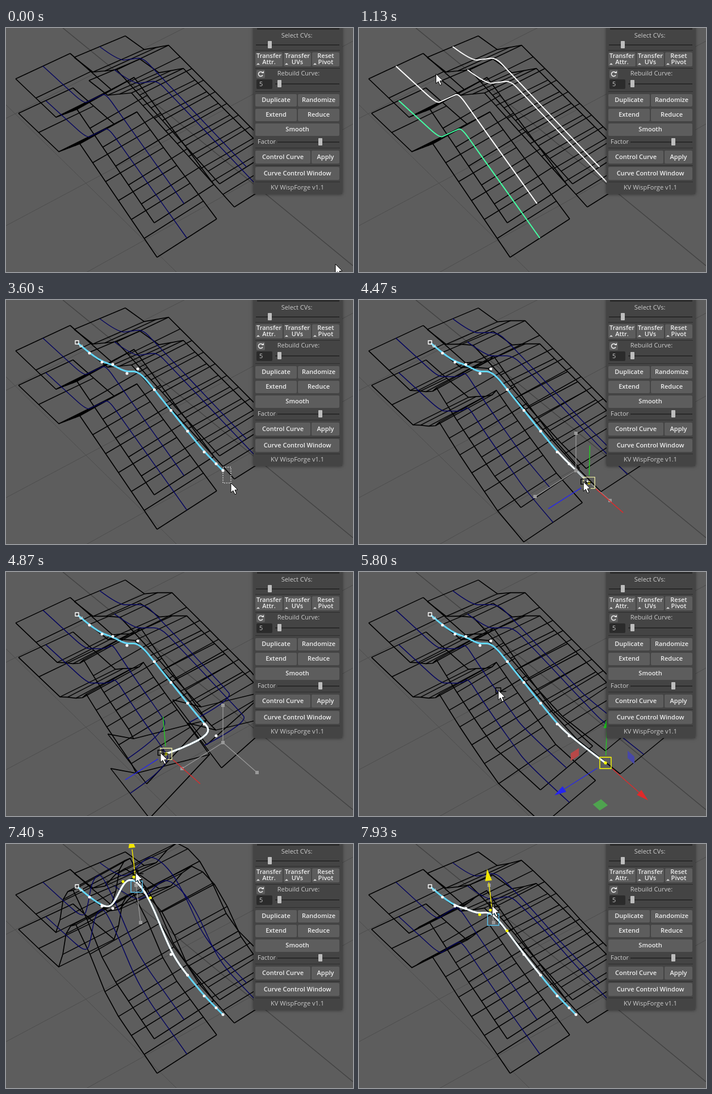
Animation, 611 px wide and 432 px high, one loop 8000 ms. Source, as an HTML page with a canvas:

```html
<!DOCTYPE html>
<html>
<head>
<meta charset="utf-8">
<style>
html, body { margin: 0; width: 100%; height: 100%; overflow: hidden; background: #5d5d5d; }
canvas { display: block; }
</style>
</head>
<body>
<canvas id="stage" width="611" height="432"></canvas>
<script>
const g = document.getElementById('stage').getContext('2d');
const LOOP = 8000, SPANS = 9, RUNGS = 12, TIP = 11, UNDO = 6000;
const FONT = '"Open Sans", "Noto Sans", sans-serif';
const GREEN = '#43ffa3', CYAN = '#64d8ff', YELLOW = '#f2e600', GRAY = '#999';

// Screen directions of the world axes
const X = [60, 53], Z = [-72, 46], Y = [0, -66];

const add = (a, b, k = 1) => [a[0] + b[0] * k, a[1] + b[1] * k];
const mix = (a, b, f) => add(a, add(b, a, -1), f);
const between = (t, a, b) => t >= a && t < b;

// Control curve: a wavy head, then an even slope down to the tip
const head = [[125,75], [147,94], [169,110], [188,114], [213,130], [232,122]];
const slope = [1, 2, 3, 4].map(k => mix(head[5], [349,269], k / 4));
const cvs = [...head, ...slope, [370,290], [382,302]];
const hump = [237, 139];

// Card edges: straight runs between key points, each split into even rungs
function edge(keys, counts) {
  let from = [0, 0];
  const pts = [from];
  keys.forEach((to, k) => {
    for (let i = 1; i <= counts[k]; i++) pts.push(mix(from, to, i / counts[k]));
    from = to;
  });
  return pts;
}
const front = { edge: edge([[71,68], [108,54], [244,255]], [2, 4, 6]), from: [96,-45], to: [105,-68] };
const back = { edge: edge([[33,26], [75,22], [256,224]], [1, 2, 9]), from: [90,-38], to: [95,-60] };
const cards = [
  { at: [120,52], ...back }, { at: [146,93], ...back },
  { at: [17,90], ...front }, { at: [22,151], ...front }
];

// Moves are [start, end, ...goal]; each begins where the one before stopped
function follow(t, start, moves) {
  return moves.reduce((pos, [a, b, ...goal]) => {
    const f = Math.max(0, Math.min(1, (t - a) / (b - a)));
    return pos.map((v, i) => v + (goal[i] - v) * f);
  }, start);
}
const cursorMoves = [
  [70, 430, 400, 386], [430, 870, 135, 81], [1130, 1730, 473, 230], [2470, 3270, 382, 296],
  [3330, 3600, 396, 324], [3600, 4130, 372, 300], [5600, 5670, 424, 336],
  [5670, 5800, 245, 210], [5800, 6000, 280, 100], [6000, 6300, 198, 168], [6300, 6500, 235, 114]
];
const tipMoves = [[4270, 4530, 30, 28], [4530, 4870, -100, 20], [5130, 5470, 52, 36]];
const liftMoves = [[6530, 6930, 100], [7070, 7930, 5]];

const knot = i => Math.max(0, Math.min(SPANS, i - 3));
function basis(i, p, s) {
  if (p === 0) return s >= knot(i) && s < knot(i + 1) ? 1 : 0;
  const l = knot(i + p) - knot(i), r = knot(i + p + 1) - knot(i + 1);
  return (l ? (s - knot(i)) / l * basis(i, p - 1, s) : 0) +
         (r ? (knot(i + p + 1) - s) / r * basis(i + 1, p - 1, s) : 0);
}
function spline(pts, s) {
  s = Math.max(0, Math.min(s, SPANS - 1e-6));
  return pts.reduce((sum, p, i) => add(sum, p, basis(i, 3, s)), [0, 0]);
}

// Ground plane coordinates, used to turn the cards with the curve
function toGround([x, y]) {
  const det = X[0] * Z[1] - Z[0] * X[1];
  return [(Z[1] * x - Z[0] * y) / det, (X[0] * y - X[1] * x) / det];
}
function heading(pts, s) {
  const [x, z] = toGround(add(spline(pts, s + .1), spline(pts, s - .1), -1));
  return Math.atan2(z, x);
}
function turn(v, angle) {
  const [x, z] = toGround(v), c = Math.cos(angle), n = Math.sin(angle);
  return add(add([0, 0], X, x * c - z * n), Z, x * n + z * c);
}

function trace(pts) {
  g.beginPath();
  pts.forEach(p => g.lineTo(...p));
}
function line(pts, color, width = 1) {
  trace(pts);
  g.strokeStyle = color;
  g.lineWidth = width;
  g.stroke();
}
function poly(pts, color) {
  trace(pts);
  g.fillStyle = color;
  g.fill();
}
function smooth(pts, color, width) {
  g.beginPath();
  g.moveTo(...pts[0]);
  for (let i = 1; i < pts.length - 1; i++) {
    const end = i === pts.length - 2 ? pts[i + 1] : mix(pts[i], pts[i + 1], .5);
    g.quadraticCurveTo(...pts[i], ...end);
  }
  g.strokeStyle = color;
  g.lineWidth = width;
  g.stroke();
}
function box(x, y, w, h, color, r = 0) {
  g.beginPath();
  g.roundRect(x, y, w, h, r);
  g.fillStyle = color;
  g.fill();
}
const square = (p, r, color, round = 0) => box(p[0] - r, p[1] - r, 2 * r, 2 * r, color, round);
const dot = (p, r, color) => square(p, r, color, r);
function frame([x, y], r, color) {
  g.strokeStyle = color;
  g.lineWidth = 1.4;
  g.strokeRect(x - r, y - r, 2 * r, 2 * r);
}

function drawGrid() {
  box(0, 0, 611, 432, '#5d5d5d');
  [160, 350, 512].forEach((y, k) => line([[0, y], [611, y - 611 * (.51 + .025 * k)]], '#4d4d4d'));
  line([[0, 136], [300, 432]], '#4d4d4d');
  line([[100, 0], [260, 131], [611, 421]], '#434343', 1.6);
}

function drawCards(shift, tip, relaxed, selected) {
  const bent = cvs.map((p, i) => i === TIP ? add(p, tip) : p);
  const frames = Array.from({ length: RUNGS + 1 }, (_, i) => {
    const s = i / RUNGS * SPANS;
    const slack = relaxed ? 14 * Math.exp(-(((i - 5) / 2.2) ** 2)) : 0;
    return {
      move: add(spline(shift, s), [slack, slack]),
      angle: heading(bent, s) - heading(cvs, s)
    };
  });
  const mids = cards.map(({ at, edge, from, to }) => {
    const left = [], right = [];
    const mid = edge.map((e, i) => {
      const { move, angle } = frames[i];
      const width = mix(from, to, i / RUNGS), turned = turn(width, angle);
      const p = add(add(add(at, e), width, .5), move);
      left.push(add(p, turned, -.5));
      right.push(add(p, turned, .5));
      line([left[i], right[i]], '#000', 1.5);
      return p;
    });
    line(left, '#000', 1.7);
    line(right, '#000', 1.7);
    return mid;
  });
  mids.forEach((m, i) =>
    smooth(m, !selected ? '#06065f' : i === 3 ? GREEN : '#fff', selected ? 2 : 1.5));
}

function drawCurve(pts, t, picked) {
  const part = (a, b, color) => {
    const count = (b - a) * 10;
    line(Array.from({ length: count + 1 }, (_, i) => spline(pts, a + i / 10)), color, 3);
  };
  if (t < 2900) return part(0, SPANS, GREEN);
  part(0, SPANS, CYAN);
  if (picked.length) part(Math.max(0, picked[0] - 3), Math.min(SPANS, picked.at(-1) + 1), '#fff');
  pts.slice(1).forEach((p, i) => dot(p, 2.5, picked.includes(i + 1) ? '#ff0' : '#fff'));
  square(pts[0], 2, '#555');
  frame(pts[0], 3, '#fff');
  line([[130,79], [130,83], [134,83], [134,79]], '#fff');
}

// The vertical axis leans with perspective
const axes = c => [[X, '#e02a2a'], [Z, '#2525f0'], [add(Y, [(c[0] - 382) * .055, 0]), '#20d020']];
function cone(tip, dir, color) {
  const len = Math.hypot(...dir), d = dir.map(v => v / len), n = [-d[1], d[0]];
  const base = add(tip, d, -21);
  poly([tip, add(base, n, 6), add(base, n, -6)], color);
}
function drawPlane(c, a, b, color) {
  const mid = add(add(c, a, .75), b, .75);
  const corner = (i, j) => add(add(mid, a, i * .1), b, j * .1);
  poly([corner(-1, -1), corner(1, -1), corner(1, 1), corner(-1, 1)], color);
}
function drawGizmo(c) {
  axes(c).forEach(([dir, color]) => {
    line([add(c, dir, .2), add(c, dir)], color, 1.3);
    cone(add(c, dir, 1.25), dir, color);
  });
  drawPlane(c, Y, Z, '#b84848');
  drawPlane(c, X, Y, '#4848a8');
  drawPlane(c, X, Z, '#4fa34f');
  frame(c, 10, '#ff0');
  dot(c, 2.5, '#ff0');
}
function drawGhost(home, dirs) {
  square(home, 3, GRAY);
  dirs.forEach(dir => {
    line([home, add(home, dir)], GRAY, 1.3);
    square(add(home, dir), 3, GRAY);
  });
}
function drawTipDrag(home, c) {
  drawGhost(home, axes(home).map(a => a[0]));
  axes(c).forEach(([dir, color]) => line([add(c, dir, .2), add(c, dir)], color, 1.4));
  frame(c, 10, '#e6e6a0');
}
function drawLiftDrag(home, c) {
  const up = axes(home)[2][0];
  drawGhost(home, [up]);
  line([add(c, up, .15), add(c, up)], YELLOW, 1.5);
  cone(add(c, up, 1.36), up, YELLOW);
  frame(c, 10, '#5cc8f5');
}

function text(s, x, y, weight = 400, align = 'center', color = '#eee') {
  g.font = `${weight} 11px ${FONT}`;
  g.textAlign = align;
  g.textBaseline = 'middle';
  g.fillStyle = color;
  g.fillText(s, x, y + .5);
}
const label = (s, x, y, align) => text(s, x, y, 400, align, '#ccc');
function button(s, x, y, w, h, lit) {
  box(x, y, w, h, lit ? '#8f8f8f' : '#5d5d5d', 2);
  const rows = s.split('|');
  rows.forEach((r, i) => text(r, x + w / 2, y + h / 2 + (i - (rows.length - 1) / 2) * 11, 600));
  if (rows.length > 1) poly([[x + 2, y + 22], [x + 5, y + 19], [x + 8, y + 22]], '#ddd');
}
// A row of buttons; the first one may be wider, or lit
function buttons(y, h, names, lead = 1, lit = false) {
  const unit = (148 - 2 * (names.length - 1)) / (names.length - 1 + lead);
  let x = 439;
  names.forEach((s, i) => {
    const w = Math.round(i ? unit : unit * lead);
    button(s, x, y, w, h, lit && i === 0);
    x += w + 2;
  });
}
function slider(x, y, handle) {
  box(x, y, 587 - x, 2, '#292929');
  box(handle, y - 6, 7, 13, '#bdbdbd', 1);
}
function drawPanel(lit) {
  g.save();
  g.shadowColor = 'rgba(0,0,0,.55)';
  g.shadowBlur = 6;
  box(436, -10, 156, 304, '#444');
  g.restore();
  box(442, 0, 145, 3, '#2b2b2b');
  [39, 71, 112, 212, 243, 272].forEach(y => box(439, y, 149, 1, '#2e2e2e'));

  label('Select CVs:', 512, 14);
  slider(440, 29, 461);
  buttons(43, 25, ['Transfer|Attr.', 'Transfer|UVs', 'Reset|Pivot']);

  box(441, 74, 15, 15, '#5d5d5d', 2);
  g.beginPath();
  g.arc(448.5, 81.5, 4, .5, 5.6);
  g.strokeStyle = '#eee';
  g.lineWidth = 1.5;
  g.stroke();
  poly([[450,80], [454,80], [454,76]], '#eee');
  label('Rebuild Curve:', 515, 81);
  box(441, 91, 28, 17, '#2b2b2b', 2);
  label('5', 446, 100, 'left');
  slider(474, 98, 478);

  [['Duplicate', 'Randomize'], ['Extend', 'Reduce'], ['Smooth']]
    .forEach((names, i) => buttons(117 + 26 * i, 22, names));
  label('Factor', 443, 202, 'left');
  slider(478, 201, 550);
  buttons(217, 23, ['Control Curve', 'Apply'], 2, lit);
  buttons(246, 23, ['Curve Control Window']);
  label('KV WispForge v1.1', 513, 283);
}

function drawMarquee([x, y], [u, v]) {
  g.setLineDash([2, 2]);
  line([[x, y], [u, y], [u, v], [x, v], [x, y]], '#fff');
  g.setLineDash([]);
}
function drawCursor(p, moveTool) {
  if (moveTool) {
    frame(p, 4.5, '#000');
    line([add(p, [5, 2]), add(p, [14, 2])], '#000', 1.5);
  }
  const arrow = [[0,0], [0,17], [4,13.5], [7,20], [10,19], [7,12.5], [12,12], [0,0]].map(o => add(p, o));
  poly(arrow, '#fff');
  line(arrow, '#000');
}

function draw(t) {
  const tip = t < UNDO ? follow(t, [0, 0], tipMoves) : [0, 0];
  const [lift] = follow(t, [0], liftMoves);
  const rise = [-.11 * lift, -lift];
  const shift = cvs.map((_, i) => i === TIP ? tip : between(i, 4, 7) ? rise : [0, 0]);
  const pts = cvs.map((p, i) => add(p, shift[i]));
  const picked = between(t, 3800, UNDO) ? [TIP] : t >= 6350 ? [4, 5, 6] : [];

  drawGrid();
  drawCards(shift, tip, between(t, 4270, UNDO), between(t, 1130, 2040));
  if (t >= 2040) drawCurve(pts, t, picked);

  if (between(t, 4270, 5470)) drawTipDrag(cvs[TIP], pts[TIP]);
  else if (picked[0] === TIP) drawGizmo(pts[TIP]);
  else if (t >= 6530) drawLiftDrag(hump, add(hump, rise));
  else if (picked.length) drawGizmo(hump);

  const mouse = between(t, 4270, 5600)
    ? add(pts[TIP], [-10, -2])
    : add(follow(t, [580, 418], cursorMoves), rise);

  drawPanel(between(t, 1730, 2530));
  if (between(t, 430, 1130)) drawMarquee([400, 386], mouse);
  if (between(t, 3330, 3800)) drawMarquee([382, 296], mouse);
  if (between(t, 6000, 6350)) drawMarquee([280, 100], mouse);
  drawCursor(mouse, t >= 4130);
}

function tick() {
  draw(performance.now() % LOOP);
  requestAnimationFrame(tick);
}
g.lineJoin = 'round';
tick();
</script>
</body>
</html>
```
